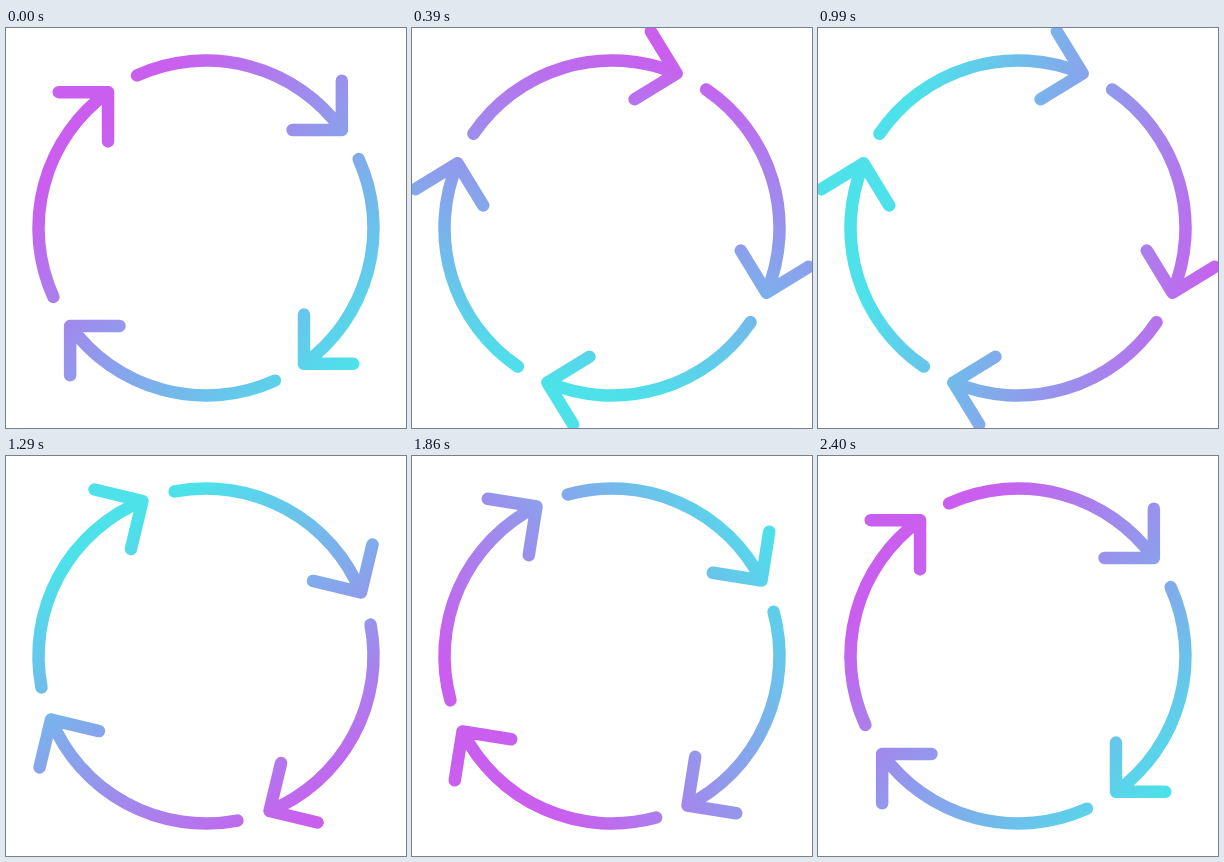
An HTML page with a canvas that plays this animation: 400x400 px, repeating every 2.43 s.

```html
<!DOCTYPE html>
<html lang="en">
<head>
<meta charset="utf-8">
<title>Rotating arrows</title>
<style>
  html, body { margin: 0; width: 100%; height: 100%; overflow: hidden; background: #fff; }
  canvas { display: block; width: 400px; height: 400px; }
</style>
</head>
<body>
<canvas id="stage" width="400" height="400"></canvas>
<script>
const ctx = document.getElementById('stage').getContext('2d');
const LOOP = 2430, STEP = 30, TURN = 2400;
const RADIUS = 167.5, HEAD = 49.3;
const TAIL_ANGLE = -114.3 * Math.PI / 180, TIP_ANGLE = -35.8 * Math.PI / 180;
const GRADIENT_HALF = 172, GRADIENT_OFFSET = 42;

const tipX = RADIUS * Math.cos(TIP_ANGLE), tipY = RADIUS * Math.sin(TIP_ANGLE);
const arrow = new Path2D();
arrow.arc(0, 0, RADIUS, TAIL_ANGLE, TIP_ANGLE);
arrow.moveTo(tipX, tipY - HEAD);
arrow.lineTo(tipX, tipY);
arrow.lineTo(tipX - HEAD, tipY);

const ring = new Path2D();
for (let i = 0; i < 4; i++) ring.addPath(arrow, new DOMMatrix().rotate(i * 90));

// The gradient turns with the ring, but around a point to the right of its centre.
function ringGradient(angle) {
  const x = GRADIENT_OFFSET * Math.cos(angle);
  const y = -GRADIENT_OFFSET * Math.sin(angle);
  const d = GRADIENT_HALF * Math.SQRT1_2;
  const gradient = ctx.createLinearGradient(x - d, y - d, x + d, y + d);
  gradient.addColorStop(0, '#ca5eee');
  gradient.addColorStop(1, '#4de1ea');
  return gradient;
}

function draw(now) {
  const time = Math.floor(now % LOOP / STEP) * STEP;
  const angle = time / TURN * 2 * Math.PI;
  ctx.resetTransform();
  ctx.clearRect(0, 0, 400, 400);
  ctx.translate(200, 200);
  ctx.rotate(angle);
  ctx.lineWidth = 12.5;
  ctx.lineCap = ctx.lineJoin = 'round';
  ctx.strokeStyle = ringGradient(angle);
  ctx.stroke(ring);
}

const start = performance.now();
function tick() {
  draw(performance.now() - start);
  requestAnimationFrame(tick);
}
tick();
</script>
</body>
</html>
```
